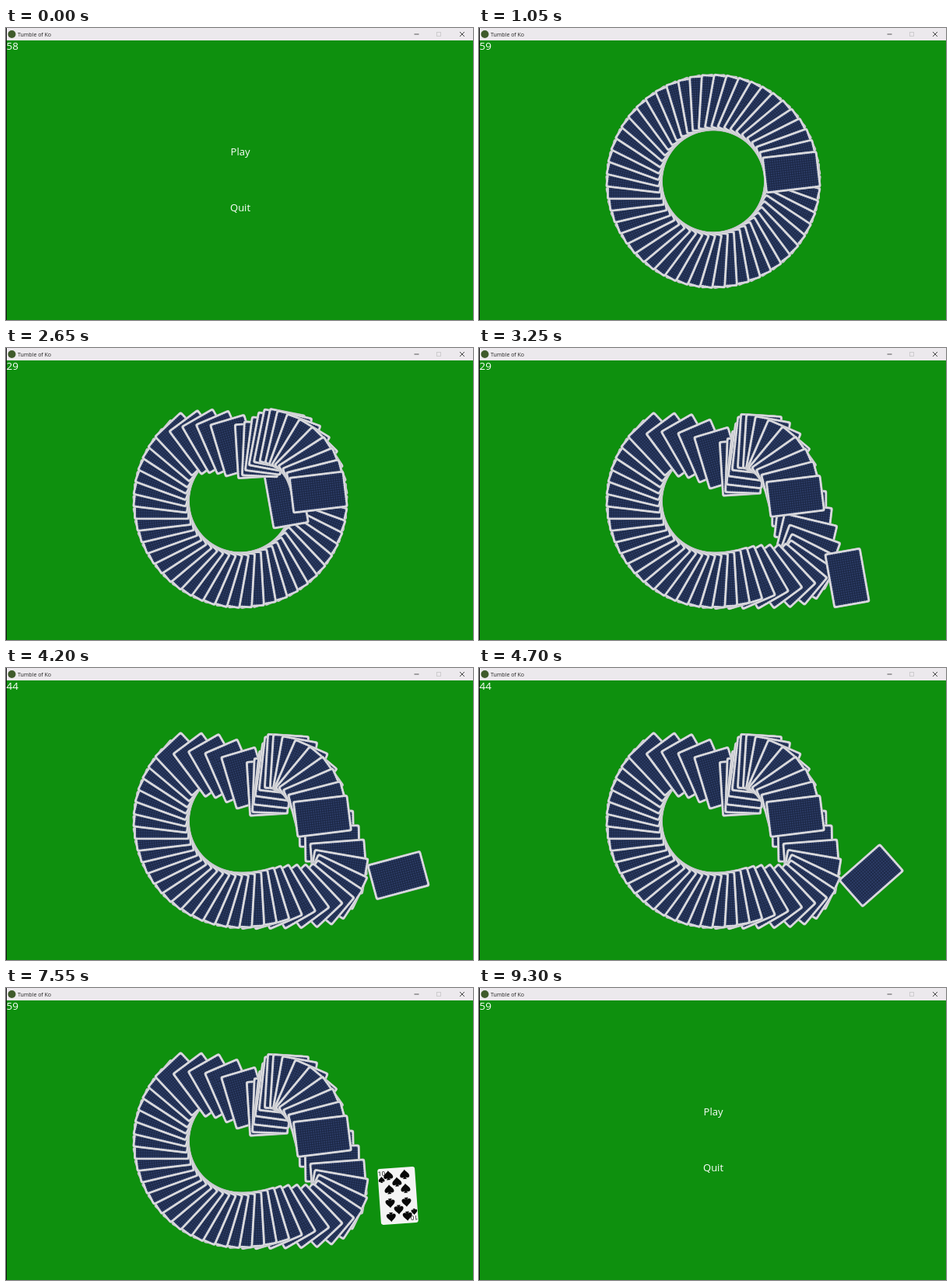
These frames come from a looping animation (600x376 px, 9350 ms). An HTML page with a canvas:

```html
<!DOCTYPE html>
<html lang="en">
<head>
<meta charset="utf-8">
<title>Tumble of Ko</title>
<style>
  html, body { margin: 0; width: 100%; height: 100%; overflow: hidden; background: #0e900e; }
  canvas { display: block; }
</style>
</head>
<body>
<canvas id="stage" width="600" height="376"></canvas>
<script>
const ctx = document.getElementById('stage').getContext('2d');
const LOOP = 9350, DEAL = 850, MENU = 8350, FLIP = 4950;
const COUNT = 54, PICKED = 39;
const CENTER = { x: 301, y: 197.3 }, RADIUS = 101;
const W = 48, H = 72;
const RAD = Math.PI / 180;

const progress = (t, from, to) => Math.min(1, Math.max(0, (t - from) / (to - from)));
const bell = (v, mid, spread) => Math.exp(-(((v - mid) / spread) ** 2));

// Each sweep of the picked card shoves the ring cards around one angle.
const pushes = [
  { from: 2100, to: 3000, mid: -98, spread: 27, dx: 40, dy: 0, turn: 0 },
  { from: 2100, to: 3000, mid: -92, spread: 25, dx: 0, dy: 58, turn: 0 },
  { from: 2050, to: 2900, mid: -50, spread: 20, dx: 0, dy: 0, turn: -34 },
  { from: 2700, to: 3200, mid: 30, spread: 27, dx: 32, dy: 33, turn: 0 },
  { from: 3400, to: 4150, mid: 14, spread: 8, dx: 6, dy: 3, turn: -18 }
];

// Key points of the picked card: time, x, y, angle
const path = [
  [2050, 284, 98, -100], [2150, 291, 108, -100], [2650, 360, 194, -100],
  [3250, 473, 296, -100], [3500, 473, 296, -100], [4200, 504, 267, -15],
  [4400, 504, 267, -15], [5300, 503.5, 267.5, -94]
];

function pickedPose(t) {
  const n = path.findIndex(k => k[0] > t);
  const b = path.at(n), a = n > 0 ? path[n - 1] : b;
  const p = a === b ? 0 : progress(t, a[0], b[0]);
  const [, x, y, deg] = a.map((v, k) => v + (b[k] - v) * p);
  return { x, y, deg };
}

function ringPose(i, t) {
  const home = (i * 360 / COUNT + 130) % 360 - 130;
  const pose = {
    x: CENTER.x + RADIUS * Math.cos(home * RAD),
    y: CENTER.y + RADIUS * Math.sin(home * RAD),
    deg: home
  };
  for (const { from, to, mid, spread, dx, dy, turn } of pushes) {
    const amount = progress(t, from, to) * bell(home, mid, spread);
    pose.x += dx * amount;
    pose.y += dy * amount;
    pose.deg += turn * amount;
  }
  return pose;
}

function roundRect(x, y, w, h, r, fill) {
  ctx.fillStyle = fill;
  ctx.beginPath();
  ctx.roundRect(x, y, w, h, r);
  ctx.fill();
}

const weave = new Path2D();
for (let x = -18; x <= 18; x += 3) { weave.moveTo(x, -33); weave.lineTo(x, 33); }
for (let y = -30; y <= 30; y += 3) { weave.moveTo(-21, y); weave.lineTo(21, y); }

function drawBack() {
  roundRect(-W / 2, -H / 2, W, H, 3, '#a9adb2');
  roundRect(-W / 2 + .3, -H / 2 + .3, W - .6, H - .6, 3, '#dadade');
  roundRect(-W / 2 + 2.9, -H / 2 + 2.9, W - 5.8, H - 5.8, 1, '#2c3c66');
  ctx.strokeStyle = '#1b2744';
  ctx.lineWidth = .9;
  ctx.stroke(weave);
}

const spade = new Path2D('M0-6C2-3 6-1 6 2C6 5 2 5 .8 3L2.5 6H-2.5L-.8 3C-2 5-6 5-6 2C-6-1-2-3 0-6Z');

function drawPip(x, y, size) {
  ctx.save();
  ctx.translate(x, y);
  ctx.scale(size, size);
  ctx.fill(spade);
  ctx.restore();
}

function drawFace() {
  roundRect(-W / 2, -H / 2, W, H, 3, '#f4f4f4');
  for (let half = 0; half < 2; half++) {
    text('10', -19, -27, 8, '#080808', 'center');
    drawPip(-19.5, -22, .65);
    for (const y of [-27, -9]) for (const x of [-10.5, 10.5]) drawPip(x, y, 1);
    drawPip(0, -18, 1);
    ctx.rotate(Math.PI);
  }
}

function drawCard(i, t) {
  const picked = i === PICKED;
  const { x, y, deg } = picked ? pickedPose(t) : ringPose(i, t);
  ctx.save();
  ctx.translate(x, y);
  ctx.rotate((deg + 90) * RAD);
  if (picked && t >= FLIP) drawFace();
  else drawBack();
  ctx.restore();
}

function text(str, x, y, size, color, align = 'left') {
  ctx.font = `${size}px "Open Sans", sans-serif`;
  ctx.textAlign = align;
  ctx.fillStyle = color;
  ctx.fillText(str, x, y);
}

function line(x1, y1, x2, y2, color) {
  ctx.strokeStyle = color;
  ctx.lineWidth = .9;
  ctx.beginPath();
  ctx.moveTo(x1, y1);
  ctx.lineTo(x2, y2);
  ctx.stroke();
}

function drawWindow() {
  ctx.fillStyle = '#0e900e';
  ctx.fillRect(0, 0, 600, 376);
  ctx.fillStyle = '#ece9ed';
  ctx.fillRect(0, 0, 600, 16);
  ctx.fillStyle = '#111';
  ctx.fillRect(0, 0, 1, 376);
  ctx.fillStyle = '#3f5a2b';
  ctx.beginPath();
  ctx.arc(7.5, 8, 5, 0, 7);
  ctx.fill();
  text('Tumble of Ko', 15, 11, 7, '#222');
  line(524.5, 8, 530.5, 8, '#444');
  ctx.strokeStyle = '#cbc9cc';
  ctx.strokeRect(553.5, 5.5, 5, 5);
  line(583, 5, 589, 11, '#333');
  line(589, 5, 583, 11, '#333');
}

// Frame-rate readout: start time, value
const rates = [[0, 58], [50, 59], [2500, 29], [3600, 44], [4900, 51], [6500, 59]];

function frame() {
  const t = performance.now() % LOOP;
  drawWindow();
  if (t >= DEAL && t < MENU) {
    for (let i = 0; i < COUNT; i++) drawCard(i, t);
  } else {
    text('Play', 301, 164, 13, '#fff', 'center');
    text('Quit', 301, 236, 13, '#fff', 'center');
  }
  text(rates.findLast(r => r[0] <= t)[1], .5, 27.5, 13.5, '#fff');
  requestAnimationFrame(frame);
}
frame();
</script>
</body>
</html>
```
